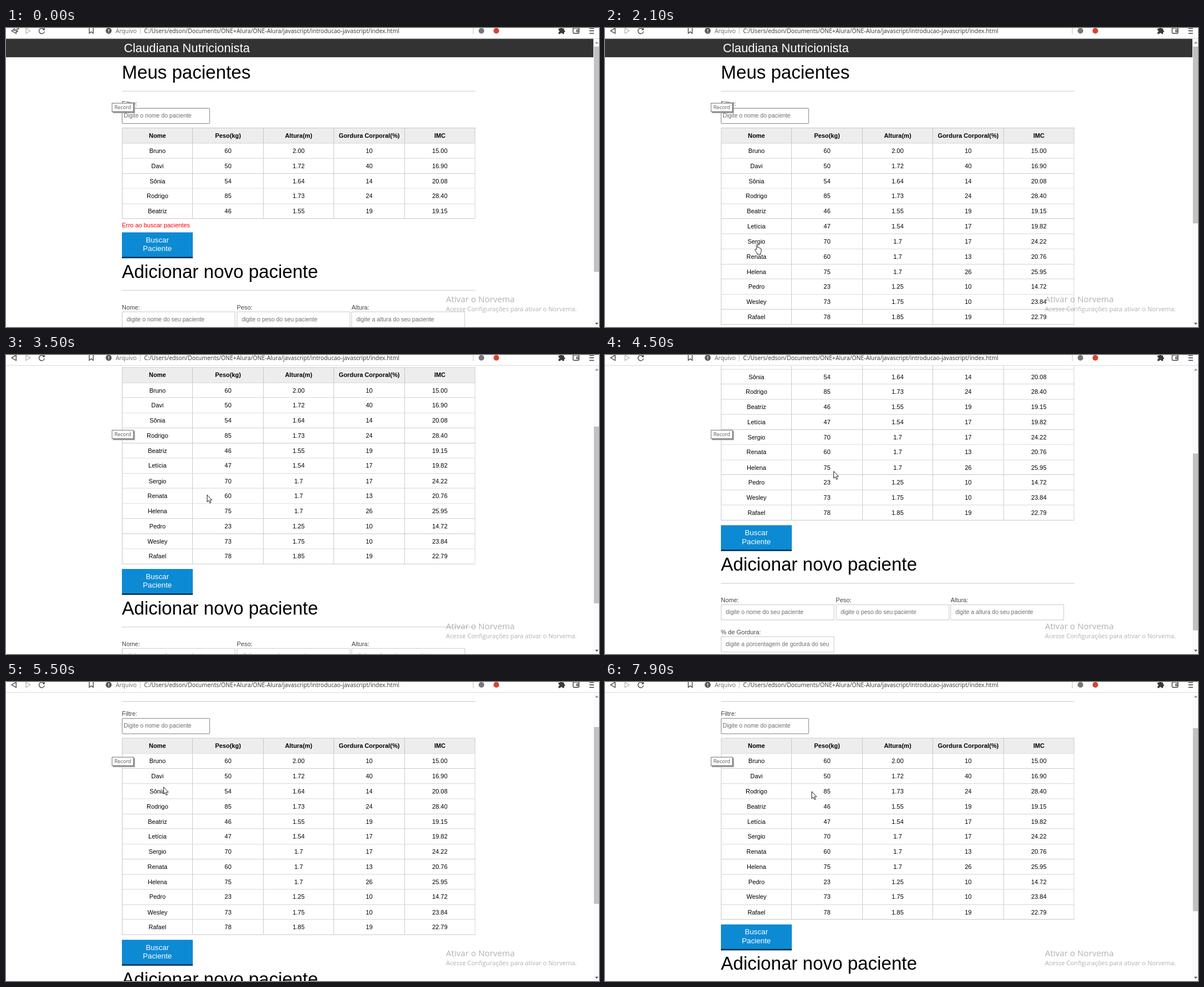
An HTML page for the animation above (8000 ms loop, 1054 by 531 pixels).

```html
<!DOCTYPE html>
<html lang="pt-BR">
<head>
<meta charset="utf-8">
<title>Meus pacientes</title>
<style>
html, body { margin: 0; width: 100%; height: 100%; overflow: hidden; background: #fff; }
body { position: relative; color: #000; --row: 34.5px; }
.ui { font-family: "Open Sans", "Noto Sans", sans-serif; line-height: 16px; white-space: nowrap; }
.abs, .bar, .view, .zoom, .page, .thumb, .tip, .cursor { position: absolute; }

/* Everything changes in hard steps on one 8 s clock */
.page, .more, .error, .thumb, .cursor, .arrow, .hand, .removed, .removed div {
  animation: 8s step-end infinite;
}

.bar { inset: 0 0 auto; height: 18px; border-bottom: 1px solid #dcdcdc; background: #fff; }
.bar svg { position: absolute; left: 0; top: 0; }
.bar .ui { position: absolute; top: -3px; font-size: 10.33px; color: #333; }

/* The page is laid out at full size and shown reduced */
.view { left: 0; top: 19px; width: 1044px; bottom: 0; overflow: hidden; }
.zoom { left: 0; top: 0; width: 1343px; transform: translateY(.25px) scale(.7775); transform-origin: 0 0; }
.page { left: 0; top: 0; width: 100%; font: 14px/20px "Liberation Sans", Arial, sans-serif; animation-name: scroll; }
header { height: 42px; padding-left: 269.5px; background: #333; color: #fff; font-size: 28px; line-height: 41px; }
main { margin-left: 265px; width: 808px; }
h2 { margin: 0; font-size: 42px; font-weight: 400; line-height: 52px; white-space: nowrap; }
hr { margin: 16px 0 0; border: 0; height: 1px; background: #bbb; }
label { display: block; color: #444; }
.input {
  box-sizing: border-box; height: 36px; overflow: hidden; white-space: nowrap;
  font-size: 13.333px; line-height: 34px; color: #6e6e6e;
}
.filter { width: 201px; padding-left: 3px; border: 1px solid #5a5a5a; border-radius: 2px; }

.table { margin-top: 9px; border: solid #bbb; border-width: 0 0 1px 1px; }
.row { display: grid; grid-template-columns: repeat(5, 1fr); height: var(--row); overflow: hidden; text-align: center; }
.row div {
  box-sizing: border-box; height: var(--row); line-height: 34px; white-space: nowrap;
  border: solid #bbb; border-width: 1px 1px 0 0;
}
.head { background: #ededed; font-weight: 700; }
.more { overflow: hidden; animation-name: load; }
.removed { animation-name: collapse; }
.removed div { animation-name: fade; }

.error { margin-top: 4px; color: #f00; overflow: hidden; animation-name: clear; }
.button {
  box-sizing: border-box; width: 162px; height: 59px; margin-top: 7px; padding-top: 8px;
  background: #0d8ad4; border-bottom: 3px solid #04284a;
  color: #fff; font-size: 17px; text-align: center;
}
.form { display: grid; grid-template-columns: repeat(3, 259px); gap: 17px 3.5px; margin-top: 28px; }
.form .input { border: 1px solid #bbb; padding: 0 10px; }
.form .input span { display: block; overflow: hidden; }

.track { left: 1044px; top: 19px; width: 10px; bottom: 0; background: #fafafa; }
.thumb { left: 1045px; width: 9px; background: #c1c1c1; animation-name: thumb; }

.tip {
  left: 188px; top: 133px; width: 37px; height: 14px; border: 1px solid #777; background: #fff;
  box-shadow: 2px 2px 1px #9a9a9a; font-size: 9.1px; line-height: 13px; text-align: center; color: #555;
}
.notice { left: 782px; color: rgba(140, 140, 140, .68); }

.cursor { left: 0; top: 0; overflow: visible; animation-name: move; }
.arrow { animation-name: arrow; }
.hand { animation-name: hand; }

@keyframes scroll {
  0% { top: 0; }
  43.75% { top: -200px; }
  45% { top: -245px; }
  46.25% { top: -286px; }
  47.5% { top: -300px; }
  58.75% { top: -200px; }
  61.25% { top: -140px; }
  62.5% { top: -100px; }
}
@keyframes thumb {
  0% { top: 33px; height: 400px; }
  26.25% { top: 33px; height: 314px; }
  43.75% { top: 127px; height: 314px; }
  45% { top: 149px; height: 314px; }
  46.25% { top: 168px; height: 314px; }
  47.5% { top: 175px; height: 314px; }
  58.75% { top: 127px; height: 314px; }
  61.25% { top: 100px; height: 314px; }
  62.5% { top: 80px; height: 314px; }
  98.75% { top: 82px; height: 325px; }
}
@keyframes load {
  0% { height: 0; }
  26.25% { height: calc(7 * var(--row)); }
}
@keyframes clear {
  0% { height: 20px; }
  26.25% { height: 0; }
}
@keyframes collapse {
  0% { height: var(--row); }
  98.75% { height: 0; }
}
@keyframes fade {
  0% { color: #000; }
  91.25% { color: rgba(0, 0, 0, .9); }
  92.5% { color: rgba(0, 0, 0, .6); }
  93.75% { color: rgba(0, 0, 0, .32); }
  95% { color: rgba(0, 0, 0, .12); }
  96.25% { color: transparent; }
}
@keyframes arrow {
  0% { opacity: 1; }
  20% { opacity: 0; }
  37.5% { opacity: 1; }
}
@keyframes hand {
  0% { opacity: 0; }
  20% { opacity: 1; }
  37.5% { opacity: 0; }
}
@keyframes move {
  0% { transform: translate(14px, -8px); }
  3.75% { transform: translate(90px, 50px); }
  5% { transform: translate(290px, 200px); }
  6.25% { transform: translate(490px, 360px); }
  7.5% { transform: translate(576px, 427px); }
  8.75% { transform: translate(410px, 345px); }
  10% { transform: translate(263px, 266px); }
  13.75% { transform: translate(312px, 288px); }
  15% { transform: translate(347px, 308px); }
  17.5% { transform: translate(405px, 424px); }
  18.75% { transform: translate(330px, 412px); }
  20% { transform: translate(270px, 384px); }
  37.5% { transform: translate(298px, 346px); }
  38.75% { transform: translate(338px, 284px); }
  40% { transform: translate(357px, 248px); }
  48.75% { transform: translate(355px, 240px); }
  51.25% { transform: translate(351px, 230px); }
  53.75% { transform: translate(348px, 222px); }
  55% { transform: translate(400px, 211px); }
  56.25% { transform: translate(406px, 206px); }
  63.75% { transform: translate(376px, 202px); }
  65% { transform: translate(340px, 196px); }
  66.25% { transform: translate(310px, 190px); }
  67.5% { transform: translate(288px, 187px); }
  68.75% { transform: translate(279.5px, 186px); }
  71.25% { transform: translate(295px, 192px); }
  72.5% { transform: translate(310px, 200px); }
  75% { transform: translate(330px, 200px); }
  76.25% { transform: translate(348px, 198px); }
  77.5% { transform: translate(360px, 196px); }
  78.75% { transform: translate(366px, 195px); }
  81.25% { transform: translate(367px, 194px); }
}
</style>
</head>
<body>
<div class="view"><div class="zoom">
  <div class="page">
    <header>Claudiana Nutricionista</header>
    <main>
      <h2 style="padding-top:9px">Meus pacientes</h2>
      <hr>
      <label style="margin-top:18px">Filtre:</label>
      <div class="input filter">Digite o nome do paciente</div>
      <div class="table" id="table"></div>
      <div class="error">Erro ao buscar pacientes</div>
      <div class="button">Buscar<br>Paciente</div>
      <h2 style="padding-top:5px">Adicionar novo paciente</h2>
      <hr>
      <div class="form" id="form"></div>
    </main>
  </div>
</div></div>

<div class="abs track"></div>
<div class="thumb"></div>
<svg class="abs" style="left:1044px;top:0" width="10" height="531">
  <path d="M3 27.5h6l-3-3.5z" fill="#8a8a8a"/>
  <path d="M3 523.5h6l-3 3.5z" fill="#505050"/>
</svg>

<div class="bar">
  <svg width="1054" height="18" fill="none" stroke="#3a3a3a" stroke-width="1.3">
    <path d="M18 .3V9.7L10 5z"/>
    <path d="M35.5 .3V9.7L43 5z" stroke="#b5b5b5"/>
    <path d="M67.5 2.5A4.800 4.800 0 1 0 68.300 6"/>
    <path d="M68.800 -.5v4.300h-4.300z" fill="#3a3a3a" stroke="none"/>
    <path d="M148-2V9.500l3.500-2.700 3.500 2.700V-2"/>
    <circle cx="182.5" cy="5" r="5.3" fill="#5a5a5a" stroke="none"/>
    <path d="M182.500 2v3.700M182.500 6.700v1.300" stroke="#fff"/>
    <path d="M238.500 0v11M830.500 0v11" stroke="#c4c4c4" stroke-width="1"/>
    <circle cx="845" cy="5" r="5" fill="#777" stroke="none"/>
    <circle cx="871.5" cy="5" r="5" fill="#d8432f" stroke="none"/>
    <path d="M982 1h3a2 2 0 0 1 4 0h3v3a1.800 1.800 0 0 1 0 3.600V10.500h-3a1.800 1.800 0 0 0-3.600 0H982V7.500a1.700 1.700 0 0 0 0-3.400z" fill="#3a3a3a" stroke="none"/>
    <rect x="1008" y="0" width="10.5" height="9.5" rx="1.5"/>
    <path d="M1019 3.500h-4.500v3h4.500M1037 .5h8M1037 5h8M1037 9.500h8"/>
  </svg>
  <div class="ui" style="left:195px;color:#666">Arquivo</div>
  <div class="ui" style="left:245.5px">C:/Users/edson/Documents/ONE+Alura/ONE-Alura/javascript/introducao-javascript/index.html</div>
</div>

<div class="tip ui">Record</div>
<div class="abs notice ui" style="top:471px;font-size:15px;line-height:20px">Ativar o Norvema</div>
<div class="abs notice ui" style="top:491px;font-size:11.04px">Acesse Configurações para ativar o Norvema.</div>

<svg class="cursor" width="14" height="20" stroke="#222" stroke-width="1" stroke-linejoin="round" fill="#fff">
  <path class="arrow" d="M.5.5V13L3.300 10.400 5.300 15l2-.9-2-4.400H9.200z"/>
  <path class="hand" d="M-.8 9.500V1.700q0-1.300 1.200-1.300t1.200 1.300V6.200q1.200-.8 2.100.4 1.300-.6 2 .6 1.700-.4 1.900 1.300V12.500q0 1.700-1 3V18H.4V16L-3.500 10.500q-.5-1.600.9-1.700z"/>
</svg>

<script>
const patients = `Bruno 60 2.00 10 15.00
Davi 50 1.72 40 16.90
Sônia 54 1.64 14 20.08
Rodrigo 85 1.73 24 28.40
Beatriz 46 1.55 19 19.15
Letícia 47 1.54 17 19.82
Sergio 70 1.7 17 24.22
Renata 60 1.7 13 20.76
Helena 75 1.7 26 25.95
Pedro 23 1.25 10 14.72
Wesley 73 1.75 10 23.84
Rafael 78 1.85 19 22.79`.split("\n").map(line => line.split(" "));

const row = (cells, kind = "") =>
  `<div class="row ${kind}">${cells.map(c => `<div>${c}</div>`).join("")}</div>`;
const rows = patients.map((p, i) => row(p, i === 2 ? "removed" : ""));

document.getElementById("table").innerHTML =
  row(["Nome", "Peso(kg)", "Altura(m)", "Gordura Corporal(%)", "IMC"], "head") +
  rows.slice(0, 5).join("") +
  `<div class="more">${rows.slice(5).join("")}</div>`;

document.getElementById("form").innerHTML = [
  ["Nome:", "digite o nome do seu paciente"],
  ["Peso:", "digite o peso do seu paciente"],
  ["Altura:", "digite a altura do seu paciente"],
  ["% de Gordura:", "digite a porcentagem de gordura do seu paciente"],
].map(([label, hint]) =>
  `<div><label>${label}</label><div class="input"><span>${hint}</span></div></div>`).join("");
</script>
</body>
</html>
```
